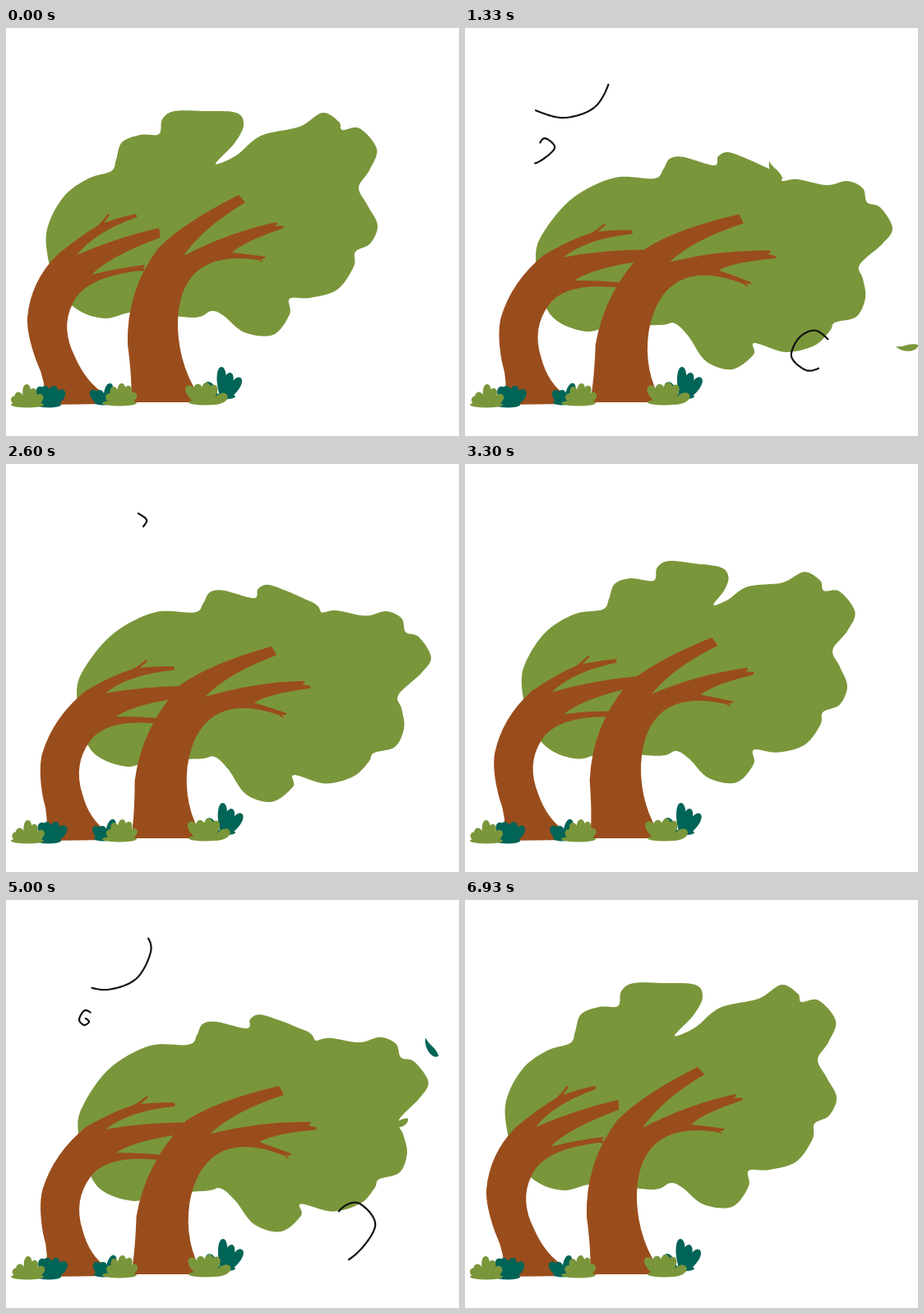
These frames come from a looping animation (551 px wide and 496 px high, 7.01 s). An HTML page with a canvas:

```html
<!DOCTYPE html>
<html lang="en">
<head>
<meta charset="utf-8">
<title>Trees in the wind</title>
<style>
html, body { margin: 0; width: 100%; height: 100%; overflow: hidden; background: #fff; }
canvas { display: block; }
</style>
</head>
<body>
<canvas id="stage" width="551" height="496"></canvas>
<script>
const ctx = document.getElementById('stage').getContext('2d');
const LOOP = 7010, GUST = 3500;
const GREEN = '#7a963a', TEAL = '#006457', BROWN = '#9a4d1c', INK = '#111';

const mix = (a, b, k) => a.map((v, i) => v + (b[i] - v) * k);

// Crown outline in calm and in full wind, clockwise from the left.
const calm = [
  49,265, 53,235, 72,203, 100,183, 128,174, 134,160, 141,139, 163,130, 186,129, 190,111, 205,101,
  240,101, 280,103, 289,118, 278,140, 255,165, 280,155, 310,131, 357,120, 385,103, 405,114, 409,124,
  430,122, 451,147, 442,173, 429,194, 440,216, 452,240, 443,262, 425,272, 423,290, 403,318, 370,328,
  345,329, 345,348, 325,373, 290,370, 265,350, 250,344, 228,352, 160,345, 120,353, 85,341, 60,310];
const windy = [
  86,278, 97,246, 132,206, 182,182, 230,183, 241,172, 249,159, 266,157, 303,167, 308,156, 320,151,
  343,159, 365,169, 376,174, 382,179, 385,185, 388,186, 405,184, 440,191, 465,186, 484,195, 489,212,
  505,218, 520,243, 508,262, 480,288, 484,305, 487,328, 476,351, 450,358, 444,368, 425,386, 390,394,
  352,383, 351,397, 325,415, 293,405, 272,375, 255,359, 238,361, 180,362, 148,369, 112,356, 95,330];

// Leans a crown: shear by height, then raise and pull back its right side.
function tilt(crown, shear, rise, pull, shift = 0) {
  return crown.map((v, i) => {
    const x = crown[i & ~1], y = crown[i | 1], r = (x - 90) / 430;
    return i % 2 ? v - rise * r : v + shear * (y - 260) - pull * r + shift;
  });
}

// A pose is a crown followed by the bend of the left and right trunk.
const rest = [...calm, 0, 0];
const blown = [...windy, 1, 1];
const easing = [...tilt(windy, 0, 8, 3), 1.02, .8];
const half = [...tilt(mix(calm, windy, .42), .03, 0, 12, 12), .82, .45];
const lifted = [...tilt(windy, .08, 22, 5), 1.04, .98];
const strong = [...tilt(windy, .07, 15, 1), .96, 1.1];

const sway = [
  [0, rest], [730, mix(rest, blown, .79)], [1330, blown], [2000, strong], [2600, easing],
  [3050, mix(easing, half, .65)], [3550, mix(rest, half, .4)], [4130, half],
  [4500, mix(half, lifted, .42)], [5000, lifted], [5900, strong], [6400, half],
  [6790, mix(rest, half, .12)], [6930, rest], [LOOP, rest]];

// Calm trunks: a start point, then control and end point of each quadratic curve.
const leftTrunk = { foot: 458, side: 75, path: [
  48,458, 49,430,37,405, 25,372,26,352, 30,308,62,276, 90,253,112,240, 118,234,124,226, 127,226,125,229,
  121,234,119,237, 138,230,157,226, 160,227,159,230, 108,248,86,276, 134,255,186,243, 188,250,187,255,
  125,278,104,300, 135,292,168,288, 170,290,166,291, 169,293,168,295, 166,296,163,295, 95,303,81,335,
  66,365,84,400, 98,432,122,446, 124,452,124,457] };
const rightTrunk = { foot: 455, side: 185, path: [
  152,455, 154,430,148,385, 146,320,185,268, 215,237,283,203, 287,207,291,212, 238,244,216,277,
  272,248,329,236, 331,238,327,241, 333,240,338,241, 338,243,336,244, 290,259,275,273, 295,275,316,278,
  315,281,309,281, 312,283,313,284, 311,285,307,282, 255,274,230,298, 208,320,209,365, 211,415,240,455] };

// colour, base x and y, half width of the base, blade width, lean in wind, blade tips
const clumps = [
  [TEAL, 52, 459, 15, 8, 3, [40,436, 47,435, 59,435, 70,440]],
  [GREEN, 26, 459, 20, 7, 2, [7,449, 13,443, 25,433, 34,438, 44,446]],
  [TEAL, 118, 456, 11, 7, 5, [104,440, 113,440, 127,432]],
  [GREEN, 138, 457, 21, 7, 1, [123,445, 130,436, 141,432, 150,435, 158,444]],
  [TEAL, 263, 449, 16, 8, 2, [243,431, 262,412, 273,419, 285,425]],
  [GREEN, 242, 456, 20, 8, 4, [220,435, 232,433, 244,431, 254,434, 269,446]]];

// Wind strokes: path points, lead of the first gust, and [time, tail, head].
const upper = {
  pts: [60,86, 88,101, 122,109, 158,96, 176,63, 170,43, 150,36, 130,60, 151,86, 171,70, 161,60],
  lead: 0,
  keys: [[600,0,0], [1330,.1,.47], [1500,.16,.545], [2100,.55,1], [2400,.79,1], [2720,1,1]] };
const middle = {
  pts: [40,138, 55,157, 75,163, 89,163, 109,146, 97,134, 89,145, 95,152, 101,148, 97,144],
  lead: 0,
  keys: [[380,0,0], [630,0,.3], [1330,.39,.8], [1500,.69,1], [1700,1,1]] };
const lower = {
  pts: [340,424, 375,440, 417,437, 449,397, 430,369, 408,375, 397,399, 415,416, 433,412, 446,398, 437,392],
  lead: 500,
  keys: [[600,0,0], [1500,.27,.67], [2000,.65,1], [2400,.96,1], [2500,1,1]] };
const winds = [upper, middle, lower];

// colour, time, x, y, angle, speed x, speed y, spin
const leaves = [
  [GREEN, 1330, 538, 388, 0, .4, .15, .002],
  [GREEN, 1330, 377, 174, 1, .35, -.06, -.002],
  [TEAL, 5000, 517, 180, 1.03, .4, -.05, .002],
  [GREEN, 5000, 477, 272, -.3, .35, .03, .002],
  [GREEN, 5900, 536, 391, 0, .4, .15, .002]];

function segment(keys, t) {
  let i = 0;
  while (i < keys.length - 2 && t >= keys[i + 1][0]) i++;
  return i;
}

// Smooth interpolation through unevenly spaced poses.
function poseAt(t) {
  const i = segment(sway, t), last = sway.length - 1;
  const [t1, p1] = sway[i], [t2, p2] = sway[i + 1];
  const [t0, p0] = sway[Math.max(i - 1, 0)], [t3, p3] = sway[Math.min(i + 2, last)];
  const d = t2 - t1, u = (t - t1) / d, v = 1 - u;
  return p1.map((a, n) => {
    const b = p2[n];
    const m1 = (b - p0[n]) / (t2 - t0) * d, m2 = (p3[n] - a) / (t3 - t1) * d;
    return a * (1 + 2 * u) * v * v + m1 * u * v * v + b * u * u * (3 - 2 * u) - m2 * u * u * v;
  });
}

function drawCrown(p) {
  const n = calm.length / 2;
  const at = i => { const k = (i + n) % n * 2; return [p[k], p[k + 1]]; };
  ctx.beginPath();
  ctx.moveTo(...at(0));
  for (let i = 0; i < n; i++) {
    const [a, b, c, d] = [at(i - 1), at(i), at(i + 1), at(i + 2)];
    ctx.bezierCurveTo(b[0] + (c[0] - a[0]) / 6, b[1] + (c[1] - a[1]) / 6,
      c[0] - (d[0] - b[0]) / 6, c[1] - (d[1] - b[1]) / 6, ...c);
  }
  ctx.fillStyle = GREEN;
  ctx.fill();
}

// Higher parts bend further right; parts right of the trunk also sink.
function drawTrunk({ foot, side, path }, k) {
  const p = path.map((v, i) => {
    const x = path[i & ~1], h = Math.max(0, foot - path[i | 1]);
    return v + k * (i % 2 ? .24 * Math.max(0, x - side) * Math.min(1, h / 150)
                          : 46 * (h / 235) ** 1.2);
  });
  ctx.beginPath();
  ctx.moveTo(p[0], p[1]);
  for (let i = 2; i < p.length; i += 4) ctx.quadraticCurveTo(p[i], p[i + 1], p[i + 2], p[i + 3]);
  ctx.fillStyle = BROWN;
  ctx.fill();
}

function drawClump([color, x, y, spread, width, lean, tips], k) {
  ctx.fillStyle = color;
  ctx.beginPath();
  ctx.ellipse(x, y - 1, spread, 3.5, 0, 0, 7);
  ctx.fill();
  for (let i = 0; i < tips.length; i += 2) {
    const tx = tips[i] + lean * k, ty = tips[i + 1], bx = x + (tx - x) * .35;
    const len = Math.hypot(tx - bx, ty - y);
    ctx.save();
    ctx.translate(bx, y);
    ctx.rotate(Math.atan2(tx - bx, y - ty));
    ctx.beginPath();
    ctx.moveTo(-2, 0);
    ctx.bezierCurveTo(-width, -len * .5, -width * .8, -len, 0, -len);
    ctx.bezierCurveTo(width * .8, -len, width, -len * .5, 2, 0);
    ctx.fill();
    ctx.restore();
  }
}

function drawLeaf([color, time, x, y, angle, vx, vy, spin], t) {
  const d = t - time;
  if (d < -250 || d > 700) return;
  ctx.save();
  ctx.translate(x + vx * d, y + vy * d);
  ctx.rotate(angle + spin * d);
  ctx.beginPath();
  ctx.moveTo(-14, -1);
  ctx.bezierCurveTo(-5, 1, 2, -6, 13, -3);
  ctx.bezierCurveTo(14, 6, -6, 8, -14, -1);
  ctx.fillStyle = color;
  ctx.fill();
  ctx.restore();
}

// Turns a few points into a dense smooth polyline with running lengths.
function trace(p) {
  const n = p.length / 2, out = [];
  const at = (i, c) => p[Math.min(Math.max(i, 0), n - 1) * 2 + c];
  for (let i = 0; i < n - 1; i++) {
    for (let s = 0; s < 16; s++) {
      const u = s / 16;
      out.push([0, 1].map(c => {
        const a = at(i - 1, c), b = at(i, c), d = at(i + 1, c), e = at(i + 2, c);
        return b + u / 2 * (d - a + u * (2 * a - 5 * b + 4 * d - e + u * (3 * (b - d) + e - a)));
      }));
    }
  }
  out.push([at(n - 1, 0), at(n - 1, 1)]);
  let len = 0;
  out.forEach((q, i) => {
    if (i) len += Math.hypot(q[0] - out[i - 1][0], q[1] - out[i - 1][1]);
    q[2] = len;
  });
  return out;
}
winds.forEach(w => { w.line = trace(w.pts); });

function drawWind({ line, keys, lead }, t) {
  const phase = t < GUST - lead ? t + lead : t - GUST;
  if (phase < keys[0][0] || phase >= keys[keys.length - 1][0]) return;
  const i = segment(keys, phase), a = keys[i], b = keys[i + 1];
  const [, tail, head] = mix(a, b, (phase - a[0]) / (b[0] - a[0]));
  const total = line[line.length - 1][2];
  ctx.beginPath();
  for (const [x, y, len] of line) {
    if (len >= tail * total && len <= head * total) ctx.lineTo(x, y);
  }
  ctx.stroke();
}

function draw(t) {
  const pose = poseAt(t), [left, right] = pose.slice(-2);
  ctx.fillStyle = '#fff';
  ctx.fillRect(0, 0, 551, 496);
  leaves.forEach(l => drawLeaf(l, t));
  drawCrown(pose);
  drawTrunk(leftTrunk, left);
  drawTrunk(rightTrunk, right);
  clumps.forEach(c => drawClump(c, right));
  ctx.strokeStyle = INK;
  ctx.lineWidth = 2.2;
  ctx.lineCap = ctx.lineJoin = 'round';
  winds.forEach(w => drawWind(w, t));
}

const start = performance.now();
function tick() {
  const t = (performance.now() - start) % LOOP, part = t % 100;
  // The picture steps twice per 100 ms, at 0 and 30.
  draw(Math.min(t - part + (part < 30 ? 0 : 30), 6930));
  requestAnimationFrame(tick);
}
tick();
</script>
</body>
</html>
```
